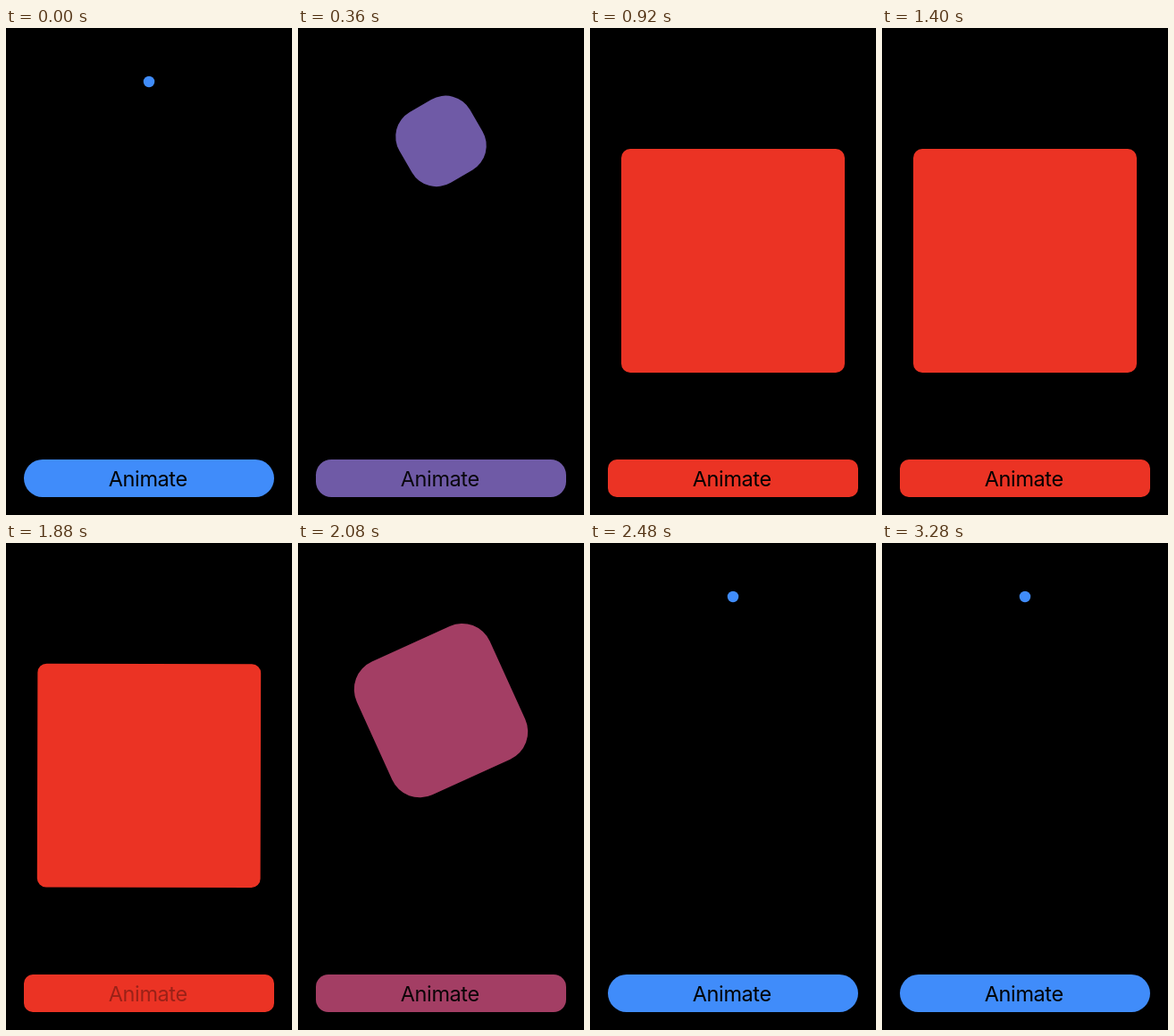
Write an HTML page with a canvas that moves like this. It is 320 px wide and 544 px high and loops after 3.32 s.

```html
<!DOCTYPE html>
<html lang="en">
<head>
<meta charset="utf-8">
<title>Animate</title>
<style>
  html, body { margin: 0; width: 100%; height: 100%; overflow: hidden; background: #000; }
  canvas { display: block; width: 320px; height: 544px; }
</style>
</head>
<body>
<canvas id="stage"></canvas>
<script>
const W = 320, H = 544, LOOP = 3320;
const MOVE = 500;                  // length of each transition
const GROW = 161, SHRINK = 1871;   // transition starts
const PRESSES = [[40, GROW], [1760, SHRINK]];
const DIM = 0.3, FADE = 300;
const BLUE = [64, 140, 250], RED = [235, 51, 36], DIP = [11, 23, 15];

const canvas = document.getElementById('stage');
const ctx = canvas.getContext('2d');
const dpr = window.devicePixelRatio || 1;
canvas.width = W * dpr;
canvas.height = H * dpr;

const clamp = v => Math.min(1, Math.max(0, v));
const lerp = (a, b, p) => a + (b - a) * p;

// cubic-bezier(.42, 0, .58, 1), solved by bisection
function easeInOut(x) {
  if (x <= 0 || x >= 1) return clamp(x);
  let lo = 0, hi = 1, s = 0.5;
  for (let i = 0; i < 24; i++) {
    s = (lo + hi) / 2;
    const u = 1 - s;
    const bx = 1.26 * u * u * s + 1.74 * u * s * s + s * s * s;
    if (bx < x) lo = s; else hi = s;
  }
  return s * s * (3 - 2 * s);
}

// The blend passes through a slightly darker middle tone.
function tint(p) {
  const dip = 4 * p * (1 - p);
  const rgb = BLUE.map((c, i) => Math.round(lerp(c, RED[i], p) - DIP[i] * dip));
  return `rgb(${rgb.join(',')})`;
}

function labelAlpha(t) {
  for (const [down, up] of PRESSES) {
    if (t >= down && t < up) return DIM;
    if (t >= up && t < up + FADE) {
      const q = 1 - (t - up) / FADE;
      return lerp(1, DIM, q * q);
    }
  }
  return 1;
}

function box(x, y, w, h, r) {
  ctx.beginPath();
  ctx.roundRect(x, y, w, h, r);
  ctx.fill();
}

function draw(t) {
  const out = easeInOut((t - GROW) / MOVE);
  const back = easeInOut((t - SHRINK) / MOVE);
  const p = out - back;

  ctx.setTransform(dpr, 0, 0, dpr, 0, 0);
  ctx.fillStyle = '#000';
  ctx.fillRect(0, 0, W, H);

  ctx.fillStyle = tint(p);
  box(20, 482, 280, 42, lerp(21, 10, p));

  ctx.save();
  ctx.translate(160, lerp(60, 260, p));
  ctx.rotate(Math.PI * (out + back));
  const k = lerp(0.05, 1, p);
  ctx.scale(k, k);
  box(-125, -125, 250, 250, lerp(125, 10, p));
  ctx.restore();

  ctx.globalAlpha = labelAlpha(t);
  ctx.fillStyle = '#000';
  ctx.font = '400 23.5px Inter, "Liberation Sans", sans-serif';
  ctx.letterSpacing = '-0.4px';
  ctx.fillText('Animate', 114.8, 511.7);
  ctx.globalAlpha = 1;
}

const start = performance.now();
function tick() {
  draw((performance.now() - start) % LOOP);
  requestAnimationFrame(tick);
}
tick();
</script>
</body>
</html>
```
